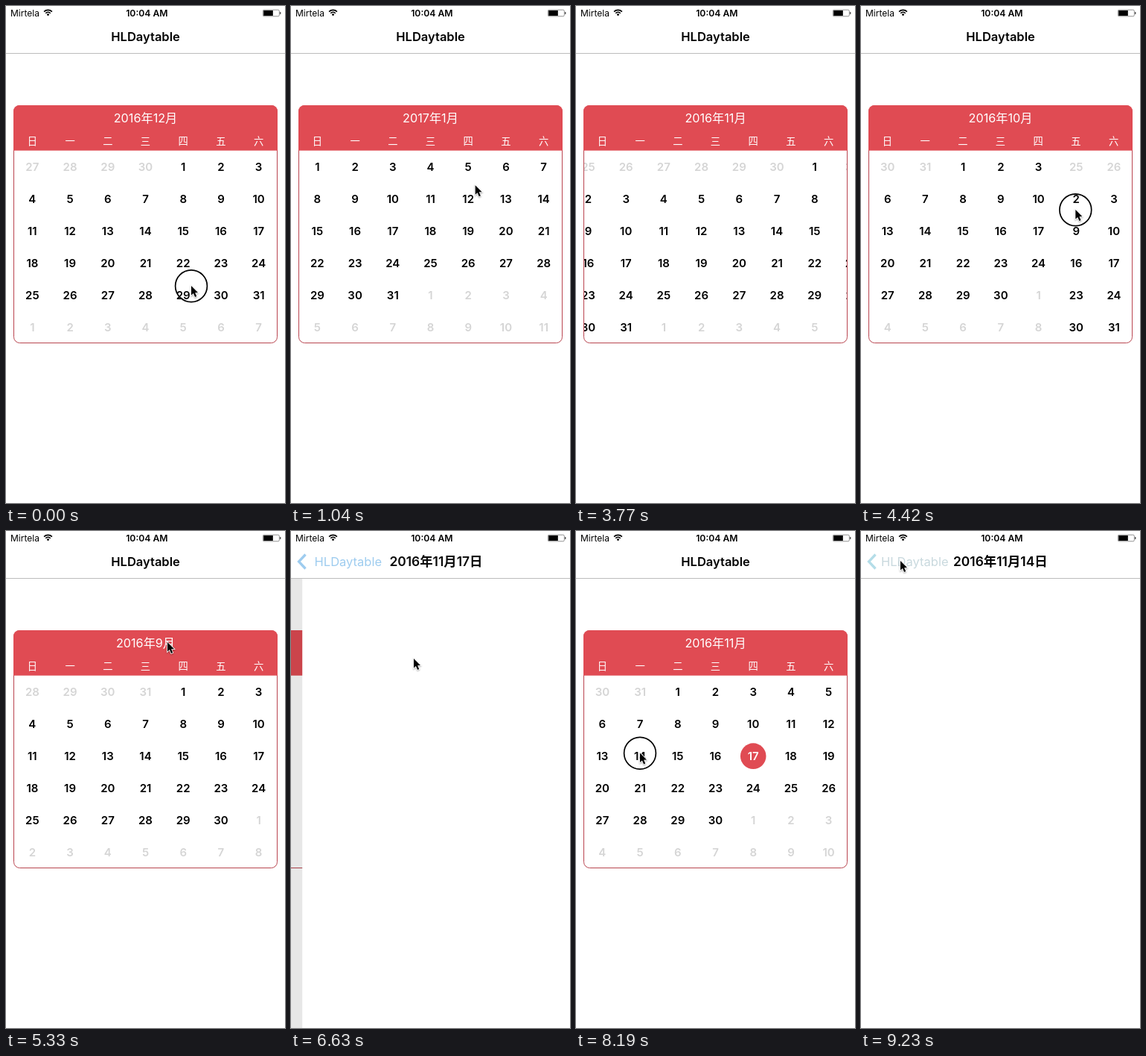
An HTML page with a canvas that plays this animation: 375 by 666 pixels, repeating every 9.36 s.

```html
<!DOCTYPE html>
<html lang="zh">
<head>
<meta charset="utf-8">
<title>Calendar</title>
<style>
html, body { margin: 0; width: 100%; height: 100%; overflow: hidden; background: #fff; }
canvas { display: block; width: 375px; height: 666px; }
</style>
</head>
<body>
<canvas id="stage"></canvas>
<script>
const W = 375, H = 666, LOOP = 9360, STEP = 130;
const APP = 'HLDaytable', NETWORK = 'Mirtela';
const RED = '#e04b53', BORDER = '#b9454f', BLUE = '#1080d8';
const FAMILY = 'Inter, "Noto Sans CJK SC", "Noto Sans CJK", sans-serif';
const CAL = { x: 10, y: 133, w: 355, h: 318.5, head: 60.7, r: 8 };
const COL = CAL.w / 7, ROW = 43.08;
const TODAY = new Date(2016, 10, 17).getTime();

const canvas = document.getElementById('stage');
const ctx = canvas.getContext('2d');
const dpr = window.devicePixelRatio || 1;
canvas.width = W * dpr;
canvas.height = H * dpr;

const clamp = v => Math.max(0, Math.min(1, v));
const mix = (a, b, k) => a + (b - a) * k;
const easeOut = u => 1 - Math.pow(1 - clamp(u), 3);
const within = (t, [a, b]) => t >= a && t < b;

// Months count from January 2016
const swipes = [
  { at: 60, dur: 700, from: 11, to: 12 },
  { at: 1190, dur: 750, from: 12, to: 13 }
];
const BACK_SWIPES = [2363, 2753, 3143, 3533, 4290];
BACK_SWIPES.forEach((at, i) => swipes.push({ at, dur: 380, from: 13 - i, to: 12 - i }));
const HOME_JUMP = 5590, HOME_MONTH = 10;

const screens = [
  { at: 6357, day: 17, dir: 1 },
  { at: 7290, day: 17, dir: -1 },
  { at: 8330, day: 14, dir: 1 }
];
const highlights = [[7020, 7290], [9100, LOOP]];

// Pointer keys: time, x, y
const path = [
  [0, 249, 375], [130, 190, 374], [330, 70, 372], [600, 90, 330],
  [1080, 262, 232], [1170, 262, 232], [1430, 84, 219], [2300, 84, 219]
];
const presses = [[0, 300], [1150, 1440]];
BACK_SWIPES.forEach((at, i) => {
  const y = 225 + i * 12;
  path.push([at, 90, y], [at + 110, 245, y], [at + 200, 440, y], [at + 330, 440, y]);
  presses.push([at, at + 180]);
});
path.push(
  [4800, 440, 240], [5180, 217, 149], [5640, 217, 149], [6000, 238, 301],
  [6360, 238, 301], [6630, 165, 171], [6890, 53, 40], [7420, 53, 40],
  [8040, 86, 297.5], [8400, 86, 297.5], [8960, 53, 40], [LOOP, 53, 40]
);
presses.push([5440, 5590], [6110, 6300], [7020, 7150], [8150, 8320], [8960, 9100]);

function text(str, x, y, size, weight, color, align = 'center') {
  ctx.font = `${weight} ${size}px ${FAMILY}`;
  ctx.textAlign = align;
  ctx.fillStyle = color;
  ctx.fillText(str, x, y);
}

function roundRect(x, y, w, h, r) {
  ctx.beginPath();
  ctx.moveTo(x + r, y);
  ctx.arcTo(x + w, y, x + w, y + h, r);
  ctx.arcTo(x + w, y + h, x, y + h, r);
  ctx.arcTo(x, y + h, x, y, r);
  ctx.arcTo(x, y, x + w, y, r);
  ctx.closePath();
}

function disc(x, y, r) {
  ctx.beginPath();
  ctx.arc(x, y, r, 0, Math.PI * 2);
}

function drawStatus() {
  text(NETWORK, 6, 13.6, 12, 400, '#000', 'left');
  text('10:04 AM', 189.4, 13.7, 12.2, 600, '#000');

  ctx.strokeStyle = ctx.fillStyle = '#000';
  ctx.lineWidth = 1.7;
  for (const r of [4.6, 7.6]) {
    ctx.beginPath();
    ctx.arc(56.5, 13, r, -Math.PI * 0.75, -Math.PI * 0.25);
    ctx.stroke();
  }
  ctx.beginPath();
  ctx.moveTo(56.5, 13.4);
  ctx.arc(56.5, 13, 2.5, -Math.PI * 0.75, -Math.PI * 0.25);
  ctx.fill();

  ctx.strokeStyle = '#777';
  ctx.lineWidth = 0.8;
  roundRect(345.3, 5.2, 22, 8.6, 1.6);
  ctx.stroke();
  ctx.fillStyle = '#000';
  ctx.fillRect(346.2, 6, 12.6, 7);
  ctx.fillStyle = '#555';
  ctx.fillRect(368, 8, 1.4, 3);
}

function drawMonth(month, left) {
  const start = new Date(2016, month, 1).getDay();
  for (let i = 0; i < 42; i++) {
    const date = new Date(2016, month, 1 - start + i);
    const x = left + COL * (i % 7 + 0.5);
    const y = 215.2 + ROW * Math.floor(i / 7);
    const inside = date.getMonth() === month % 12;
    const today = inside && date.getTime() === TODAY;
    if (today) {
      ctx.fillStyle = RED;
      disc(x, y + 0.3, 17.3);
      ctx.fill();
    }
    text(date.getDate(), x, y + 5.5, 15, 600, today ? '#fff' : inside ? '#000' : '#d5d5d5');
  }
}

function calendarState(t) {
  if (t >= HOME_JUMP) return { shown: HOME_MONTH, pos: HOME_MONTH };
  let shown = 11, pos = 11;
  for (const s of swipes) {
    if (t < s.at) break;
    pos = mix(s.from, s.to, easeOut((t - s.at) / s.dur));
    if (t >= s.at + s.dur) shown = s.to;
  }
  return { shown, pos };
}

function drawCalendar(t) {
  const { shown, pos } = calendarState(t);
  const { x, y, w, h, head, r } = CAL;
  ctx.save();
  roundRect(x, y, w, h, r);
  ctx.clip();
  ctx.fillStyle = '#fff';
  ctx.fillRect(x, y, w, h);
  for (let m = Math.floor(pos); m <= Math.ceil(pos); m++) drawMonth(m, x + (m - pos) * w);
  ctx.restore();

  ctx.strokeStyle = BORDER;
  ctx.lineWidth = 1;
  roundRect(x + 0.5, y + 0.5, w - 1, h - 0.5, r);
  ctx.stroke();

  ctx.save();
  roundRect(x, y, w, h, r);
  ctx.clip();
  ctx.fillStyle = RED;
  ctx.fillRect(x, y, w, head);
  ctx.restore();

  const label = `${2016 + Math.floor(shown / 12)}年${shown % 12 + 1}月`;
  text(label, 187.5, 155.7, 16.2, 400, '#fff');
  [...'日一二三四五六'].forEach((d, i) => text(d, x + COL * (i + 0.5), 186, 13.3, 300, '#fff'));
}

// Push progress, fade and chosen day of the detail screen
function screenState(t) {
  const state = { p: 0, fade: 0, day: 17 };
  for (const s of screens) {
    if (t < s.at) break;
    const sec = (t - s.at) / 1000, k = 18.3 * sec;
    const p = sec > 0.5 ? 1 : 1 - Math.exp(-k) * (1 + k);
    const fade = clamp(sec / 0.5);
    state.p = s.dir > 0 ? p : 1 - p;
    state.fade = s.dir > 0 ? fade : 1 - fade;
    state.day = s.day;
  }
  return state;
}

function drawNav({ p, fade, day }, pressed) {
  ctx.fillStyle = '#fff';
  ctx.fillRect(0, 0, W, 64);
  ctx.fillStyle = '#bcbcbc';
  ctx.fillRect(0, 63, W, 1);

  ctx.globalAlpha = clamp(1 - 2 * p);
  text(APP, mix(187.5, 72, p), 47, 16.5, 600, '#000');

  ctx.globalAlpha = Math.pow(fade, 1.5);
  text(APP, mix(140, 27, p), 47, 16.5, 400, pressed ? '#c9d9de' : BLUE, 'left');
  ctx.strokeStyle = pressed ? '#b4dde8' : BLUE;
  ctx.lineWidth = 3.3;
  ctx.beginPath();
  ctx.moveTo(19.5, 31.5);
  ctx.lineTo(10.5, 41);
  ctx.lineTo(19.5, 50.5);
  ctx.stroke();

  ctx.globalAlpha = clamp(p);
  text(`2016年11月${day}日`, mix(375, 187.3, p), 47, 17.4, 600, '#000');
  ctx.globalAlpha = 1;
}

function drawBody(t, { p }) {
  if (p < 1) {
    ctx.save();
    ctx.translate(-0.3 * W * p, 0);
    drawCalendar(t);
    ctx.restore();
  }
  if (p > 0) {
    ctx.fillStyle = `rgba(0,0,0,${0.1 * p})`;
    ctx.fillRect(0, 64, W, H);
    ctx.fillStyle = '#fff';
    ctx.fillRect(W * (1 - p), 64, W, H);
  }
}

function drawPointer(t) {
  let i = 1;
  while (i < path.length - 1 && path[i][0] <= t) i++;
  const [t0, x0, y0] = path[i - 1], [t1, x1, y1] = path[i];
  const k = clamp((t - t0) / (t1 - t0));
  const x = mix(x0, x1, k), y = mix(y0, y1, k);

  if (presses.some(s => within(t, s))) {
    ctx.strokeStyle = '#000';
    ctx.lineWidth = 1.7;
    disc(x, y + 0.2, 21.4);
    ctx.stroke();
  }

  ctx.save();
  ctx.translate(x, y);
  ctx.beginPath();
  ctx.moveTo(0, 0);
  for (const [px, py] of [[0, 12.6], [2.9, 10], [5.1, 15], [7.2, 14.1], [5.1, 9.2], [9, 9]]) ctx.lineTo(px, py);
  ctx.closePath();
  ctx.shadowColor = 'rgba(0,0,0,0.35)';
  ctx.shadowBlur = 2 * dpr;
  ctx.shadowOffsetY = dpr;
  ctx.strokeStyle = '#fff';
  ctx.lineWidth = 1.6;
  ctx.stroke();
  ctx.shadowColor = 'transparent';
  ctx.fillStyle = '#000';
  ctx.fill();
  ctx.restore();
}

function draw(t) {
  ctx.setTransform(dpr, 0, 0, dpr, 0, 0);
  ctx.fillStyle = '#fff';
  ctx.fillRect(0, 0, W, H);
  const state = screenState(t);
  drawBody(t, state);
  drawNav(state, highlights.some(s => within(t, s)));
  drawStatus();
  drawPointer(t);
}

let origin = null;
function tick(now) {
  if (origin === null) origin = now;
  const t = (now - origin) % LOOP;
  draw(Math.floor(t / STEP) * STEP);
  requestAnimationFrame(tick);
}
draw(0);
requestAnimationFrame(tick);
</script>
</body>
</html>
```
